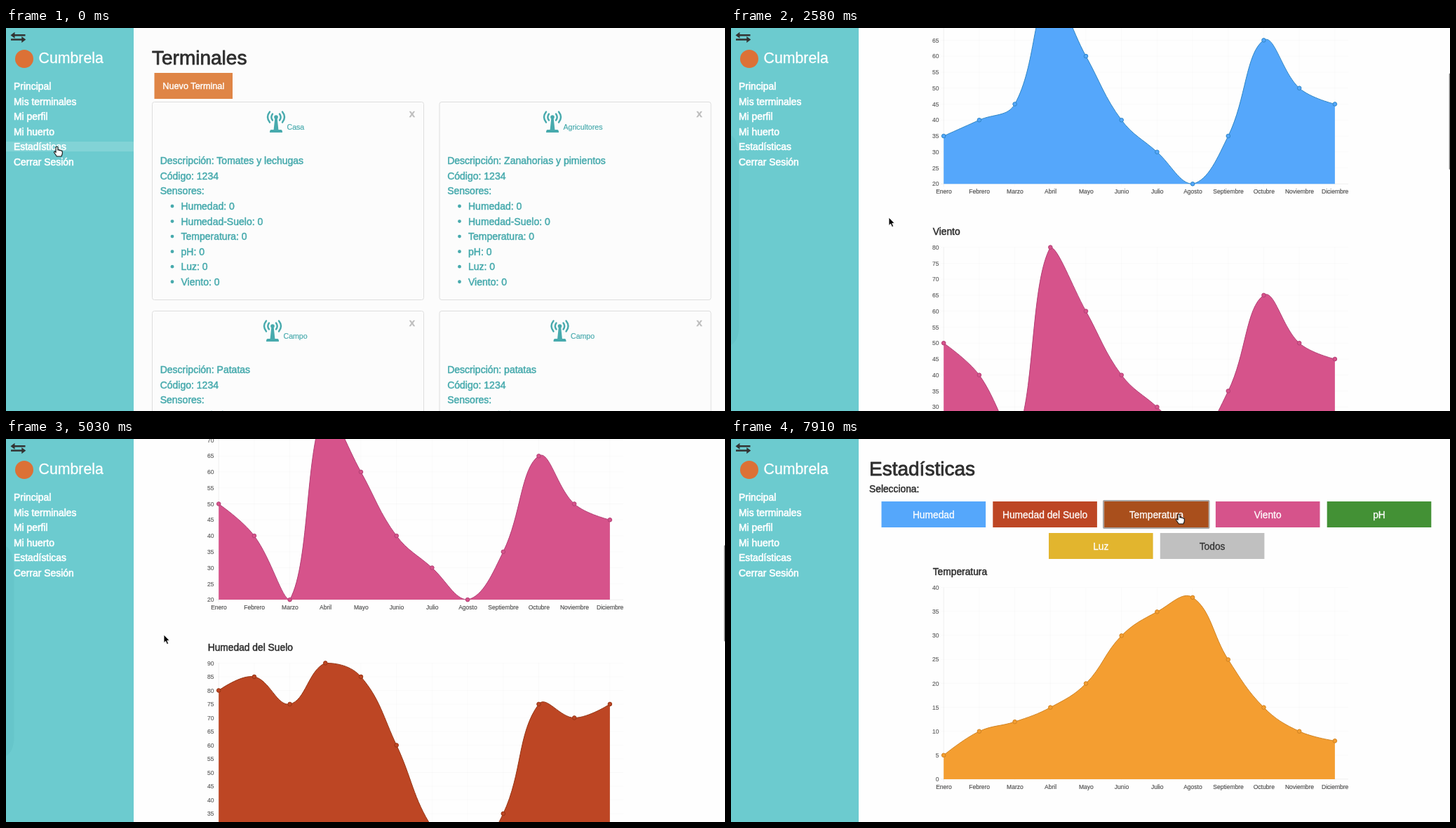
Write an HTML page that moves like this. It is 1025 by 546 pixels and loops after 8000 ms.

```html
<!DOCTYPE html>
<html lang="es">
<head>
<meta charset="utf-8">
<title>Panel de huerto</title>
<style>
  html, body { margin: 0; width: 100%; height: 100%; overflow: hidden; background: #fefefe; }
  svg { display: block; width: 1025px; height: 546px; }
  text { font-family: "Liberation Sans", Arial, Helvetica, sans-serif; white-space: pre; stroke-linejoin: round; }
</style>
</head>
<body>
<svg id="stage" viewBox="0 0 1025 546"></svg>
<script>
const LOOP = 8000;
const STEP = 171.7, PHASE = 37;   // the screen refreshes at this cadence
const TEAL = '#47aaad', DARK = '#2e2e2e';

// Moments in ms
const PAGE_IN = 450, LEAVE_LINK = 700, SCROLL_START = 1580, HOVER = 6710, CLICK = 6870, FILTER = 7170;

// Key points: refresh number, value(s)
const SCROLL = [[9, 0], [10, 10.3], [19, 578], [25, 1155.5], [26.5, 1225], [29, 619.3], [35, 0]];
const POINTER = [[3, 72.5, 169], [8, 225, 270], [27, 225, 270], [28, 225, 279],
  [32, 225, 279], [35, 245, 270], [39, 638.5, 107]];

const stage = document.getElementById('stage');
const easeOut = p => 1 - Math.pow(1 - Math.min(1, Math.max(0, p)), 4);

function el(parent, tag, attrs = {}, content) {
  const node = document.createElementNS('http://www.w3.org/2000/svg', tag);
  for (const key in attrs) node.setAttribute(key, attrs[key]);
  if (content !== undefined) node.textContent = content;
  parent.appendChild(node);
  return node;
}
const group = (parent, x = 0, y = 0) => el(parent, 'g', { transform: `translate(${x} ${y})` });
const rect = (parent, x, y, width, height, fill, more) =>
  el(parent, 'rect', { x, y, width, height, fill, ...more });
const path = (parent, d, more) => el(parent, 'path', { d, ...more });
const label = (parent, str, x, y, size, fill, weight = 0.5, anchor = 'start') => el(parent, 'text', {
  x, y, fill, 'font-size': size, 'text-anchor': anchor, stroke: fill, 'stroke-width': weight
}, str);
const show = (node, on) => node.setAttribute('visibility', on ? 'visible' : 'hidden');
const move = (node, x, y) => node.setAttribute('transform', `translate(${x} ${y})`);

function at(keys, n) {
  const i = keys.findIndex(k => k[0] > n);
  if (i < 1) return keys[i ? keys.length - 1 : 0].slice(1);
  const a = keys[i - 1], b = keys[i];
  let f = (n - a[0]) / (b[0] - a[0]);
  if (i === keys.length - 1) f = 1 - (1 - f) ** 2;   // the last leg glides to rest
  return a.slice(1).map((v, j) => v + (b[j + 1] - v) * f);
}

/* ---------- Terminals page ---------- */
const terminals = group(stage);
rect(terminals, 182, 0, 843, 546, '#fcfcfc');
label(terminals, 'Terminales', 208, 52, 28, DARK, 0.8);
rect(terminals, 211.5, 64, 111.5, 37, '#df8546');
label(terminals, 'Nuevo Terminal', 267.3, 87, 12.7, '#fff', 0.4, 'middle');

function antenna(parent, x, y) {
  const g = group(parent, x, y);
  path(g, 'M-1.6 -6H1.6L3.4 11H7Q9 11 9 15H-9Q-9 11 -7 11H-3.4Z', { fill: TEAL });
  el(g, 'circle', { cy: -7, r: 2.8, fill: TEAL });
  const wave = 'M5 -11.5Q8.4 -7 5 -2.5M9 -14.5Q15 -7 9 0.5';
  for (const flip of [1, -1]) {
    path(g, wave, { fill: 'none', stroke: TEAL, 'stroke-width': 2.4, 'stroke-linecap': 'round', transform: `scale(${flip} 1)` });
  }
}

function card(x, y, name, iconX, crop) {
  const g = group(terminals, x, y);
  rect(g, 0.5, 0.5, 387, 282, '#fcfcfc', { rx: 3, stroke: '#dedede' });
  antenna(g, iconX, 29);
  label(g, name, iconX + 15.5, 40, 10.6, TEAL, 0.2);
  label(g, 'x', 371, 22, 15, '#bdbdbd', 0.3, 'middle').setAttribute('font-weight', 'bold');
  ['Descripción: ' + crop, 'Código: 1234', 'Sensores:'].forEach((s, i) =>
    label(g, s, 11.7, 89 + i * 21.6, 14, TEAL));
  ['Humedad', 'Humedad-Suelo', 'Temperatura', 'pH', 'Luz', 'Viento'].forEach((s, i) => {
    const cy = 149 + i * 21.55;
    el(g, 'circle', { cx: 29, cy, r: 2.4, fill: TEAL });
    label(g, s + ': 0', 41.5, cy + 5, 14, TEAL);
  });
}
card(208, 105, 'Casa', 177, 'Tomates y lechugas');
card(617.5, 105, 'Agricultores', 161.5, 'Zanahorias y pimientos');
card(208, 403, 'Campo', 172, 'Patatas');
card(617.5, 403, 'Campo', 172, 'patatas');

/* ---------- Statistics page ---------- */
const stats = group(stage);
label(stats, 'Estadísticas', 197, 52, 28, DARK, 0.8);
label(stats, 'Selecciona:', 197, 76, 13.8, DARK);
const focusRing = rect(stats, 531, 88, 150.5, 39, 'none', { stroke: '#a9a5a3', 'stroke-width': 2, rx: 1 });

function buttonRow(x, y, items) {
  return items.map(([str, fill, ink = '#fff'], i) => {
    const left = x + i * 158.8;
    const box = rect(stats, left, y, 148.6, 37, fill);
    label(stats, str, left + 74.3, y + 23.5, 13.8, ink, 0.3, 'middle');
    return box;
  });
}
const tempButton = buttonRow(214.5, 89, [['Humedad', '#55a7fb'], ['Humedad del Suelo', '#bd4624'],
  ['Temperatura', '#d9692a'], ['Viento', '#d6538b'], ['pH', '#439135']])[2];
buttonRow(453, 134, [['Luz', '#e2b52e'], ['Todos', '#c0c0c0', '#333']]);

const MONTHS = ['Enero', 'Febrero', 'Marzo', 'Abril', 'Mayo', 'Junio', 'Julio', 'Agosto',
  'Septiembre', 'Octubre', 'Noviembre', 'Diciembre'];
const X0 = 303.2, DX = 50.7, TOP = 211.7, BASE = 484.9, PITCH = 363.5;

function makeChart(title, min, max, fill, line, data) {
  const g = group(stats);
  label(g, title, 287.7, 194, 13.8, DARK);
  const toX = i => X0 + i * DX;
  const toY = v => BASE - (v - min) / (max - min) * (BASE - TOP);
  const grid = (d, opacity) => path(g, d, { stroke: '#000', 'stroke-opacity': opacity });
  for (let v = min; v <= max; v += 5) {
    const y = toY(v);
    grid(`M299 ${y}H880`, v > min ? 0.018 : 0.06);
    label(g, v, 296.5, y + 3.2, 8.5, '#5c5c5c', 0.15, 'end');
  }
  MONTHS.forEach((m, i) => {
    grid(`M${toX(i)} ${TOP}V${BASE + 4}`, i ? 0.018 : 0.06);
    label(g, m, toX(i) + 0.3, BASE + 13.6, 8.5, '#4c4c4c', 0.15, 'middle');
  });
  const area = path(g, '', { fill });
  const curve = path(g, '', { fill: 'none', stroke: line, 'stroke-width': 1 });
  const dots = data.map((v, i) => el(g, 'circle', { cx: toX(i), r: 2.8, fill, stroke: line }));

  function draw(grow) {
    const pts = data.map((v, i) => ({ x: toX(i), y: BASE + (toY(v) - BASE) * grow }));
    const d = smooth(pts);
    curve.setAttribute('d', d);
    area.setAttribute('d', `${d}V${BASE}H${X0}Z`);
    dots.forEach((c, i) => c.setAttribute('cy', pts[i].y));
  }
  return { g, draw };
}

// Cubic spline whose handles depend on neighbour distances and stay inside the plot.
function smooth(pts) {
  const clamp = y => Math.min(BASE, Math.max(TOP, y));
  const handles = pts.map((p, i) => {
    const a = pts[i - 1], b = pts[i + 1];
    if (!a || !b) return { inner: p, outer: p };
    const da = Math.hypot(p.x - a.x, p.y - a.y), db = Math.hypot(b.x - p.x, b.y - p.y);
    const side = f => ({ x: p.x + f * (b.x - a.x), y: clamp(p.y + f * (b.y - a.y)) });
    return { inner: side(-0.4 * da / (da + db)), outer: side(0.4 * db / (da + db)) };
  });
  return pts.map((p, i) => {
    if (!i) return `M${p.x} ${p.y}`;
    const o = handles[i - 1].outer, n = handles[i].inner;
    return `C${o.x} ${o.y} ${n.x} ${n.y} ${p.x} ${p.y}`;
  }).join('');
}

const fromApril = [80, 60, 40, 30, 20, 35, 65, 50, 45];
const juneBell = MONTHS.map((_, i) => 10 + 70 * Math.exp(-(((i - 5) / 1.5) ** 2)));
const charts = [
  makeChart('Humedad', 20, 80, '#55a7fb', '#2f86c4', [35, 40, 45, ...fromApril]),
  makeChart('Viento', 20, 80, '#d6538b', '#b23f74', [50, 40, 20, ...fromApril]),
  makeChart('Humedad del Suelo', 20, 90, '#bd4624', '#953413', [80, 85, 75, 90, 85, 60, 30, 20, 35, 75, 70, 75]),
  makeChart('Temperatura', 0, 40, '#f49e31', '#d08322', [5, 10, 12, 15, 20, 30, 35, 38, 25, 15, 10, 8]),
  makeChart('ph', 10, 80, '#439135', '#2c7423', juneBell)
];
const TEMP = 3;

/* ---------- Sidebar ---------- */
const side = group(stage);
rect(side, 0, 0, 182, 546, '#6ccbcf');
const shade = path(side, 'M0 153Q9 158 11.5 180V425Q11 446 0 452Z', { fill: '#0a6a70', 'fill-opacity': 0.06 });
const hover = rect(side, 0, 162, 182, 14, '#fff', { 'fill-opacity': 0.15 });
path(side, 'M11 10.3H27.5M7 16.5H24', { stroke: '#333', 'stroke-width': 2.5 });
path(side, 'M6.5 10.3L12.5 5.8V14.8ZM28.3 16.5L22.3 12V21Z', { fill: '#333' });
el(side, 'circle', { cx: 26, cy: 44, r: 13, fill: '#dc7136' });
label(side, 'Cumbrela', 46.5, 50, 21.3, '#fff', 0.3);
['Principal', 'Mis terminales', 'Mi perfil', 'Mi huerto', 'Estadísticas', 'Cerrar Sesión'].forEach((s, i) =>
  label(side, s, 11, 88 + i * 21.55, 13.9, '#fff', 0.6));

/* ---------- Scrollbar and pointer ---------- */
const thumb = rect(stage, 1023.7, 0, 3, 137, '#808080', { rx: 1 });
const arrow = path(stage, 'M0 0V11.6L2.6 9.2L4.5 13.6L6.6 12.7L4.8 8.4H8.2Z',
  { fill: '#000', stroke: '#fff', 'stroke-width': 0.9 });
const hand = path(stage,
  'M-1.4 0.8Q0 -0.9 1.4 0.8V5Q3 4 3.8 5.4Q5.4 4.6 6 6.1Q7.7 5.6 7.8 7.5V10.2Q7.4 12 6.4 14H-0.2Q-1.6 11.6 -3.6 9Q-4.5 7.2 -2.8 7L-1.4 8.3Z',
  { fill: '#fff', stroke: '#111', 'stroke-width': 1.1, 'stroke-linejoin': 'round' });

function render(t) {
  const n = Math.floor((t - PHASE) / STEP);
  const [scroll] = at(SCROLL, n), [px, py] = at(POINTER, n);
  const statsOn = t >= PAGE_IN, filtered = t >= FILTER;

  show(terminals, !statsOn);
  show(stats, statsOn);
  show(hover, t < LEAVE_LINK);
  show(shade, t >= LEAVE_LINK && n < 33);
  move(stats, 0, -scroll);

  const grow = easeOut((t - (filtered ? FILTER : PAGE_IN) + 50) / 1000);
  charts.forEach((c, i) => {
    const on = statsOn && (!filtered || i === TEMP);
    show(c.g, on);
    if (!on) return;
    move(c.g, 0, filtered ? 0 : i * PITCH);
    c.draw(grow);
  });

  tempButton.setAttribute('fill', t >= HOVER ? '#a94f1c' : '#d9692a');
  show(focusRing, t >= CLICK);
  show(thumb, t >= SCROLL_START && !filtered);
  thumb.setAttribute('y', 1 + scroll * 0.243);

  const pointing = t < LEAVE_LINK || t >= HOVER;
  show(hand, pointing);
  show(arrow, !pointing);
  move(pointing ? hand : arrow, px, py);
}

function frame(now) {
  render(now % LOOP);
  requestAnimationFrame(frame);
}
render(0);
requestAnimationFrame(frame);
</script>
</body>
</html>
```
